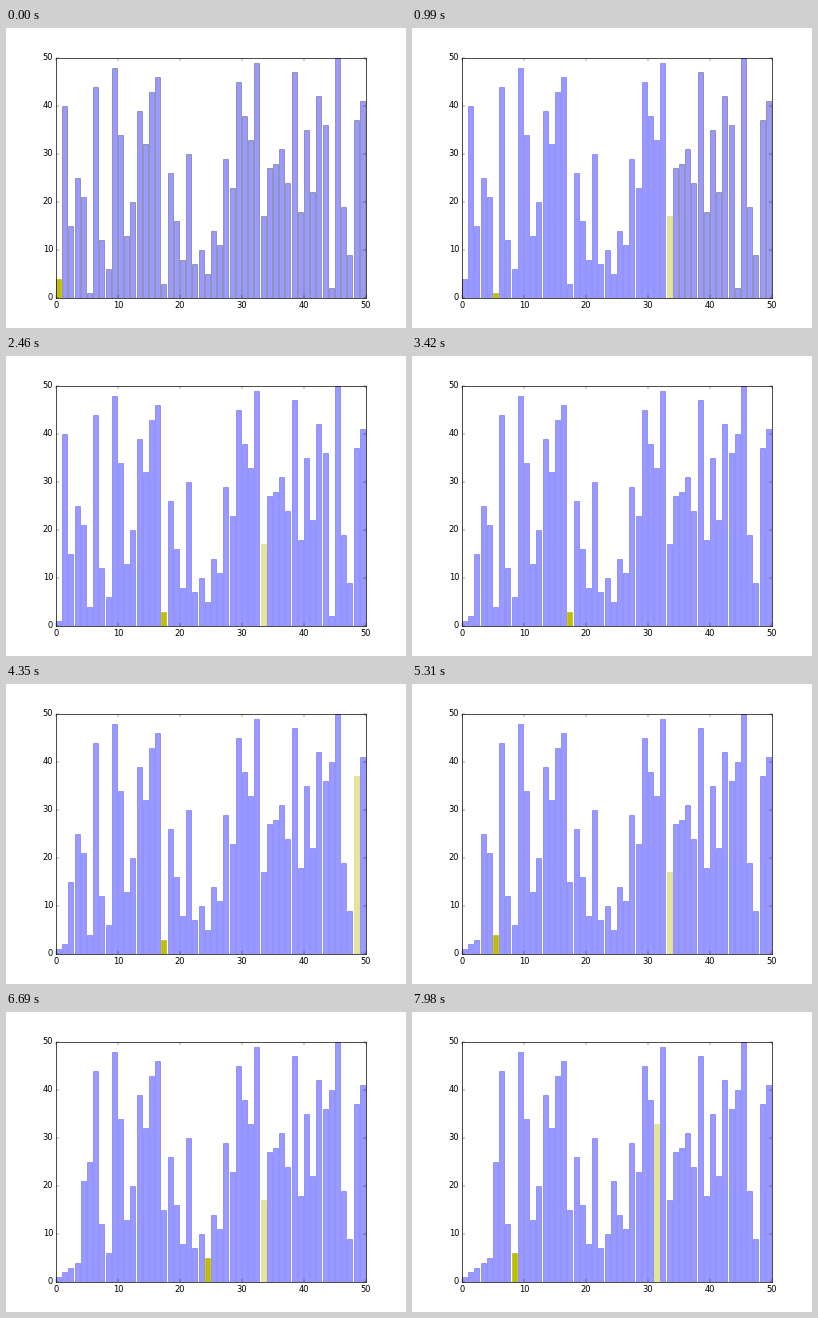
Recreate the animation shown at these times as a matplotlib script. Size 400 by 300 pixels, loop 8 s.

```python
import matplotlib.pyplot as plt
from matplotlib.animation import FuncAnimation

LOOP, INTERVAL, STEP = 8000, 20, 30   # ms

VALUES = [4, 40, 15, 25, 21, 1, 44, 12, 6, 48,
          34, 13, 20, 39, 32, 43, 46, 3, 26, 16,
          8, 30, 7, 10, 5, 14, 11, 29, 23, 45,
          38, 33, 49, 17, 27, 28, 31, 24, 47, 18,
          35, 22, 42, 36, 2, 50, 19, 9, 37, 41]
N = len(VALUES)

BLUE = (0, 0, 1)
YELLOW = (0.75, 0.75, 0)
BLACK = (0, 0, 0)
FADED = 0.4

plt.rcParams.update({
    "font.family": "DejaVu Sans", "font.size": 12,
    "axes.linewidth": 1, "patch.linewidth": 1, "savefig.dpi": "figure",
    "ytick.alignment": "center",
})


def selection_sort(values):
    """Yield (heights, cursor, index of the minimum) for every comparison."""
    a = list(values)
    for i in range(N):
        low = i
        for j in range(i, N):
            if a[j] < a[low]:
                low = j
            yield tuple(a), j, low
        a[i], a[low] = a[low], a[i]


states = list(selection_sort(VALUES))

fig = plt.figure(figsize=(8, 6), dpi=50, facecolor="white")
ax = fig.add_axes([0.125, 0.1, 0.775, 0.8])
ax.set(xlim=(0, 50), ylim=(0, 50))
ax.set_xticks(range(0, 51, 10))
ax.set_yticks(range(0, 51, 10))
ax.tick_params(direction="in", top=True, right=True,
               length=4, width=0.5, pad=4, labelsize=12)
bars = ax.bar(range(N), VALUES, width=0.8, align="edge", linewidth=1)


def paint(bar, face, edge, alpha):
    bar.set_alpha(alpha)
    bar.set_facecolor(face)
    bar.set_edgecolor(edge)


def update(frame):
    # rounding keeps every 30 ms step on its own tick
    step = (frame * INTERVAL + INTERVAL // 2) // STEP
    heights, cursor, low = states[step]
    for k, (bar, h) in enumerate(zip(bars, heights)):
        bar.set_height(h)
        if k == low:
            paint(bar, YELLOW, YELLOW, 1)
        elif k == cursor:
            paint(bar, YELLOW, YELLOW, FADED)
        else:
            # bars not yet visited keep their black outline
            paint(bar, BLUE, BLUE if k <= step else BLACK, FADED)
    return list(bars)


anim = FuncAnimation(fig, update, frames=LOOP // INTERVAL, interval=INTERVAL,
                     init_func=lambda: update(0), repeat=True,
                     repeat_delay=0, blit=False)
plt.show()
```
